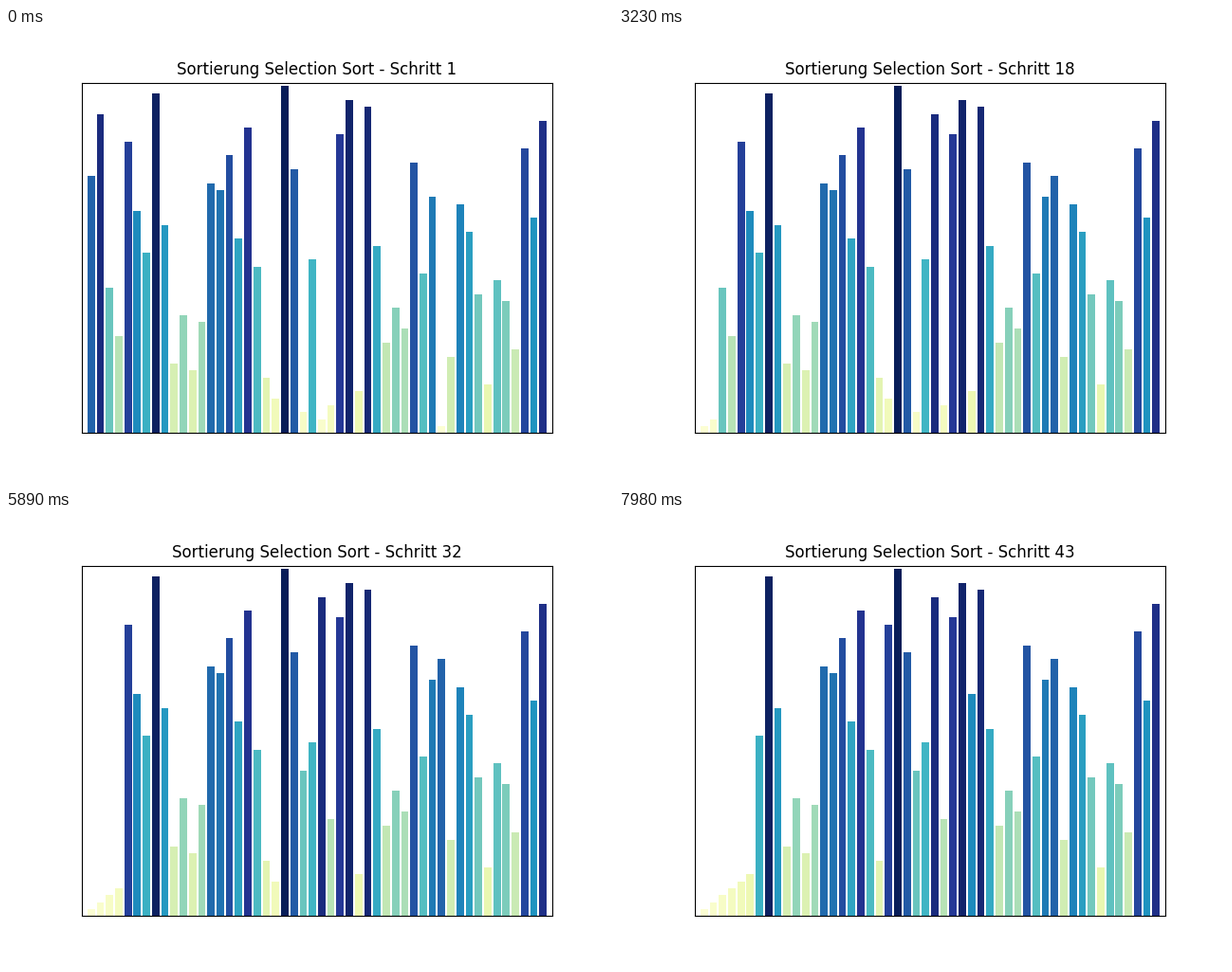
A matplotlib script that plays this animation: 640 by 480 pixels, repeating every 8000 ms.

```python
import matplotlib.pyplot as plt
from matplotlib.animation import FuncAnimation

# the shuffled input; every later state follows from sorting it
VALUES = [37, 46, 21, 14, 42, 32, 26, 49, 30, 10, 17, 9, 16, 36, 35, 40, 28,
          44, 24, 8, 5, 50, 38, 3, 25, 2, 4, 43, 48, 6, 47, 27, 13, 18, 15,
          39, 23, 34, 1, 11, 33, 29, 20, 7, 22, 19, 12, 41, 31, 45]
N = len(VALUES)
STEP_MS = 190
TICK_MS = 20
LOOP_MS = 8000


def selection_sort(values):
    """Yield the list each time a smaller minimum is found."""
    a = list(values)
    for i in range(len(a)):
        low = i
        for j in range(i + 1, len(a)):
            if a[j] < a[low]:
                low = j
                yield list(a)
        a[i], a[low] = a[low], a[i]


steps = list(selection_sort(VALUES))
cmap = plt.get_cmap("YlGnBu")
plt.rcParams["font.family"] = "DejaVu Sans"

fig, ax = plt.subplots(figsize=(6.4, 4.8), dpi=100)
bars = ax.bar(range(N), VALUES, width=0.8)
ax.set_xlim(-1, N)
ax.set_ylim(0, N * 1.01)
ax.set_xticks([])
ax.set_yticks([])
title = ax.set_title("", fontsize=12)


def update(frame):
    # round to the nearest tick, as a step is not a whole number of ticks
    n = (frame * TICK_MS + TICK_MS // 2) // STEP_MS
    for bar, value in zip(bars, steps[n]):
        bar.set_height(value)
        bar.set_facecolor(cmap(value / N))
    title.set_text(f"Sortierung Selection Sort - Schritt {n + 1}")
    return [*bars, title]


anim = FuncAnimation(fig, update, frames=LOOP_MS // TICK_MS,
                     init_func=lambda: update(0), interval=TICK_MS,
                     repeat=True, repeat_delay=0)
plt.show()
```
